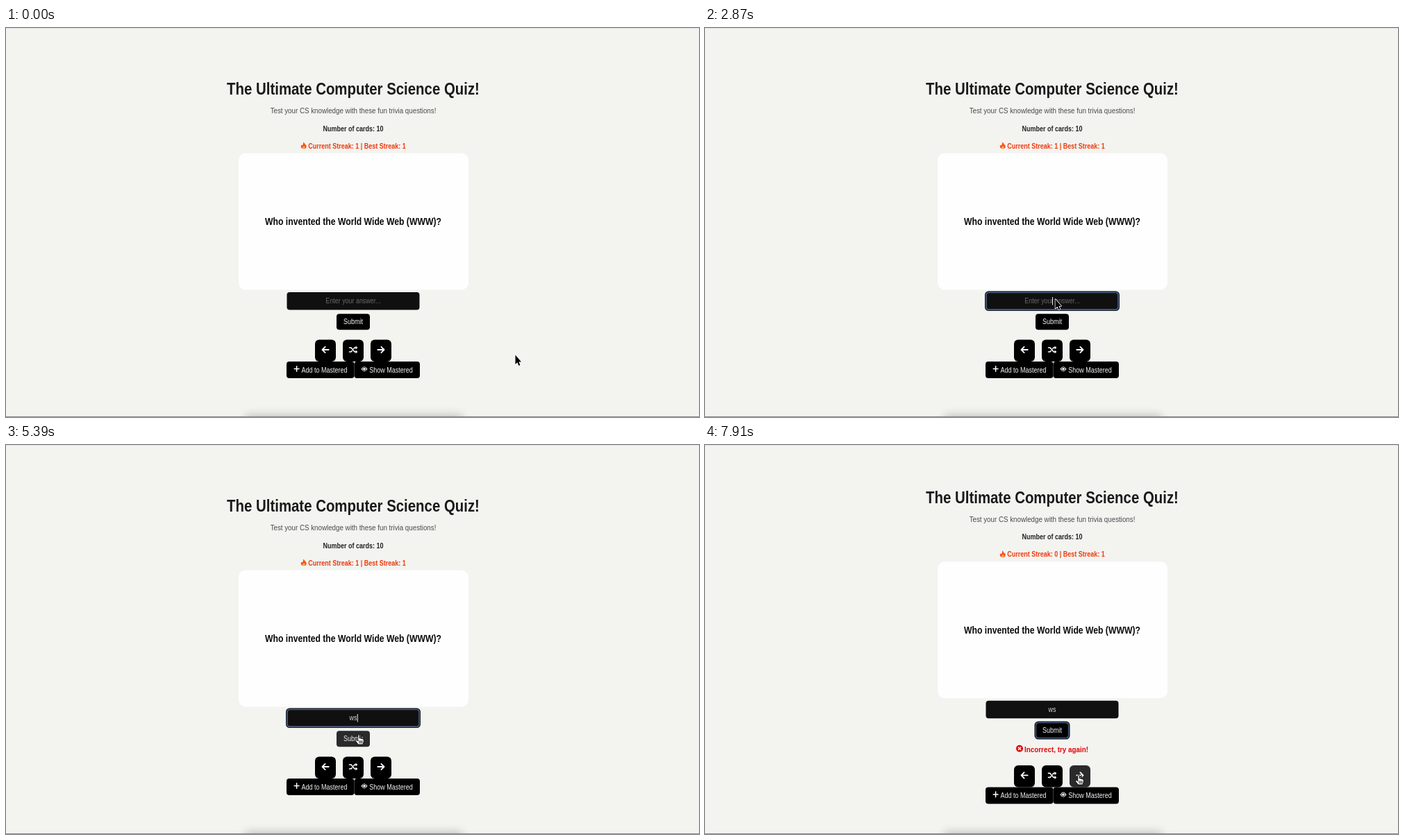
Write an HTML page that moves like this. It is 998 px wide and 561 px high and loops after 8 s.

```html
<!DOCTYPE html>
<html lang="en">
<head>
<meta charset="utf-8">
<title>Computer Science Quiz</title>
<style>
  html, body { margin: 0; width: 100%; height: 100%; overflow: hidden; background: #f3f3f0; }
  svg { display: block; width: 998px; height: 561px; }
  text { font-family: "Liberation Sans", Arial, Helvetica, sans-serif; font-size: 10.6px; }
  .b { font-weight: 700; }
</style>
</head>
<body>
<svg id="stage" viewBox="0 0 998 561" xmlns="http://www.w3.org/2000/svg">
  <defs>
    <filter id="soft" x="-20%" y="-150%" width="140%" height="400%"><feGaussianBlur stdDeviation="7"/></filter>
  </defs>
  <rect width="998" height="561" fill="#f3f3f0"/>
  <rect x="345" y="559" width="312" height="30" fill="#000" opacity=".24" filter="url(#soft)"/>
  <rect width="998" height="1" fill="#e2e2e0"/>
  <rect y="560" width="998" height="1" fill="#8c8c8c"/>
  <g id="upper"></g>
  <g id="feedback"></g>
  <g id="lower"></g>
  <g id="arrow">
    <path d="M0 0V13.6L2.9 10.8 4.9 15.4 6.9 14.4 5 10H8.6Z" fill="#000" stroke="#fff" stroke-width="1.5" stroke-linejoin="round" paint-order="stroke"/>
  </g>
  <g id="hand" stroke="#000" stroke-width=".9" stroke-linejoin="round" stroke-linecap="round">
    <path d="M-1.2 7V1Q-1.2-.4 0-.4T1.2 1V5Q3 4 3.5 5.4 5-4.6 3.5 5.4 5 4.6 5.5 6 7.2 5.4 7.2 7.4V10L5.9 14H-.6L-4.1 9.6Q-4.8 8.2-3.4 7.6-2.4 7.4-1.2 8.8Z" fill="#fff"/>
    <path d="M1 8.5V12M2.9 8.5V12M4.8 8.5V12" fill="none"/>
  </g>
</svg>
<script>
const LOOP = 8000, SQUEEZE = .85;
const FOCUS = 2420, TYPE_W = 3800, TYPE_S = 4060, SUBMIT = 5600;
const $ = id => document.getElementById(id);

function add(parent, tag, attrs, content) {
  const el = document.createElementNS('http://www.w3.org/2000/svg', tag);
  for (const key in attrs) el.setAttribute(key, attrs[key]);
  if (content) el.textContent = content;
  return parent.appendChild(el);
}

function label(parent, content, x, y, fill, size = 10.6, bold = false, anchor = 'middle') {
  return add(parent, 'text', {
    x: x / SQUEEZE, y, fill, transform: `scale(${SQUEEZE} 1)`, 'text-anchor': anchor,
    style: `font-size:${size}px`, class: bold ? 'b' : ''
  }, content);
}
const box = (parent, x, y, width, height, rx, fill) =>
  add(parent, 'rect', { x, y, width, height, rx, fill });
const line = (parent, d, stroke = '#fff', width = 1.8) =>
  add(parent, 'path', { d, fill: 'none', stroke, 'stroke-width': width, 'stroke-linecap': 'round', 'stroke-linejoin': 'round' });

function ring(parent, x, y, width, height) {
  const g = add(parent, 'g', { fill: 'none' });
  add(g, 'rect', { x: x - .7, y: y - .7, width: width + 1.4, height: height + 1.4, rx: 4.5, stroke: '#101a2c', 'stroke-width': 1.6 });
  add(g, 'rect', { x: x + .6, y: y + .6, width: width - 1.2, height: height - 1.2, rx: 3.5, stroke: '#6d8fc4', 'stroke-width': .8 });
  return g;
}

const upper = $('upper'), lower = $('lower'), feedback = $('feedback');

label(upper, 'The Ultimate Computer Science Quiz!', 500, 96.3, '#1a1a1a', 24, true);
label(upper, 'Test your CS knowledge with these fun trivia questions!', 500, 123.3, '#4a4a4e', 11.5);
label(upper, 'Number of cards: 10', 500, 148.8, '#222', 10.6, true);
add(upper, 'path', { d: 'M428 164.500Q431 166.500 431 169L432 167.800Q434.300 173.800 429 174.300 423.600 174 425 168.500L426.600 169.800Q428.800 167.500 428 164.500Z', fill: '#f4511e' });
add(upper, 'path', { d: 'M429 169.500Q432 173.600 429 173.800 426 173.600 427.500 171.300L428.400 172Z', fill: '#ffc53d' });
const streak = label(upper, 'Current Streak: 1 | Best Streak: 1', 505.500, 173.600, '#f0380a', 10.6, true);
box(upper, 335, 180.500, 331, 197, 10, '#fefefe');
label(upper, 'Who invented the World Wide Web (WWW)?', 500, 284, '#0a0a0a', 14.35, true);

box(upper, 404.500, 381, 191, 25.500, 4, '#101010');
const inputRing = ring(upper, 404.500, 381, 191, 25.500);
const placeholder = label(upper, 'Enter your answer...', 500, 397.400, '#6a6a6a', 10.5);
const typed = label(upper, '', 500, 397.400, '#d4d4d4');
const caret = add(upper, 'rect', { y: 388, width: 1, height: 11.500, fill: '#e8e8e8' });

const submit = box(upper, 476, 412.300, 48, 23, 4, '#000');
const submitRing = ring(upper, 476, 412.300, 48, 23);
label(upper, 'Submit', 500, 427.400, '#f2f2f2');

add(feedback, 'circle', { cx: 453, cy: 437.800, r: 5, fill: '#e00606' });
line(feedback, 'M451.300 436.100L454.700 439.500M454.700 436.100L451.300 439.500', '#fff', 1.5);
label(feedback, 'Incorrect, try again!', 506, 443.500, '#e00606', 11.6, true);

const navButtons = [445, 485, 525].map(x => box(lower, x, 449.500, 30, 31.500, 6, '#000'));
line(lower, 'M464.700 464H455.800M459.600 459.800L455.500 464 459.600 468.200');
line(lower, 'M535.300 464H544.200M540.400 459.800L544.500 464 540.400 468.200');
line(lower, 'M494.500 461H497L502 467H504.800M494.500 467H497L498.300 465.500M500.700 462.500L502 461H504.800', '#fff', 1.6);
for (const y of [461, 467])
  add(lower, 'path', { d: `M503.500 ${y - 2.500}L506.300 ${y} 503.500 ${y + 2.500}Z`, fill: '#fff' });

box(lower, 404, 481, 97.500, 24, 4, '#000');
box(lower, 501.500, 481, 94.500, 24, 4, '#000');
line(lower, 'M415.200 491.500H422M418.600 487.700V495.300', '#fff', 1.5);
label(lower, 'Add to Mastered', 425.500, 497, '#f2f2f2', 10.6, false, 'start');
add(lower, 'path', { d: 'M511.500 491.800Q516 484.500 520.500 491.800 516 499 511.500 491.800Z', fill: '#fff' });
add(lower, 'circle', { cx: 516, cy: 491.800, r: 2.300, fill: '#fff', stroke: '#000', 'stroke-width': 1 });
label(lower, 'Show Mastered', 523.300, 497, '#f2f2f2', 10.6, false, 'start');

// time, x, y of the pointer tip
const path = [
  [0, 733.5, 471.5], [750, 491, 398], [860, 491, 398], [1030, 498, 400], [1310, 498.5, 400],
  [1710, 504.5, 391], [4150, 504.5, 391], [4550, 506, 409], [4900, 508, 418],
  [5800, 508, 418], [6050, 509, 426], [6500, 514, 437], [7210, 521.5, 454], [7720, 538, 476], [LOOP, 538, 476]
];
function pointerAt(t) {
  const i = Math.max(1, path.findIndex(p => p[0] >= t));
  const [t0, x0, y0] = path[i - 1], [t1, x1, y1] = path[i];
  const u = (t - t0) / (t1 - t0), k = u * u * (3 - 2 * u);
  return [x0 + (x1 - x0) * k, y0 + (y1 - y0) * k];
}

const show = (el, on) => el.setAttribute('visibility', on ? 'visible' : 'hidden');
const ramp = (t, start) => Math.min(1, Math.max(0, (t - start) / 250));
function hover(el, amount) {
  const v = Math.round(42 * amount);
  el.setAttribute('fill', `rgb(${v},${v},${v})`);
}

function render(t) {
  const sent = t >= SUBMIT, focused = t >= FOCUS && !sent;
  upper.setAttribute('transform', `translate(0 ${sent ? -12.3 : 0})`);
  lower.setAttribute('transform', `translate(0 ${sent ? 12.4 : 0})`);
  show(feedback, sent);
  streak.textContent = `Current Streak: ${sent ? 0 : 1} | Best Streak: 1`;

  const answer = t < TYPE_W ? '' : t < TYPE_S ? 'w' : 'ws';
  typed.textContent = answer;
  show(placeholder, !answer);
  show(inputRing, focused);
  show(submitRing, sent);

  const lastKey = t >= TYPE_S ? TYPE_S : t >= TYPE_W ? TYPE_W : FOCUS;
  show(caret, focused && (t - lastKey) % 1000 < 500);
  caret.setAttribute('x', [500, 503.6, 505.8][answer.length]);

  hover(submit, ramp(t, 4620) - ramp(t, 6010));
  hover(navButtons[2], ramp(t, 7480));

  const [x, y] = pointerAt(t);
  const pointing = (t > 4620 && t < 6000) || t > 7480;
  for (const id of ['arrow', 'hand']) $(id).setAttribute('transform', `translate(${x} ${y})`);
  show($('arrow'), !pointing);
  show($('hand'), pointing);
}

const start = performance.now();
function tick() {
  render((performance.now() - start) % LOOP);
  requestAnimationFrame(tick);
}
tick();
</script>
</body>
</html>
```
